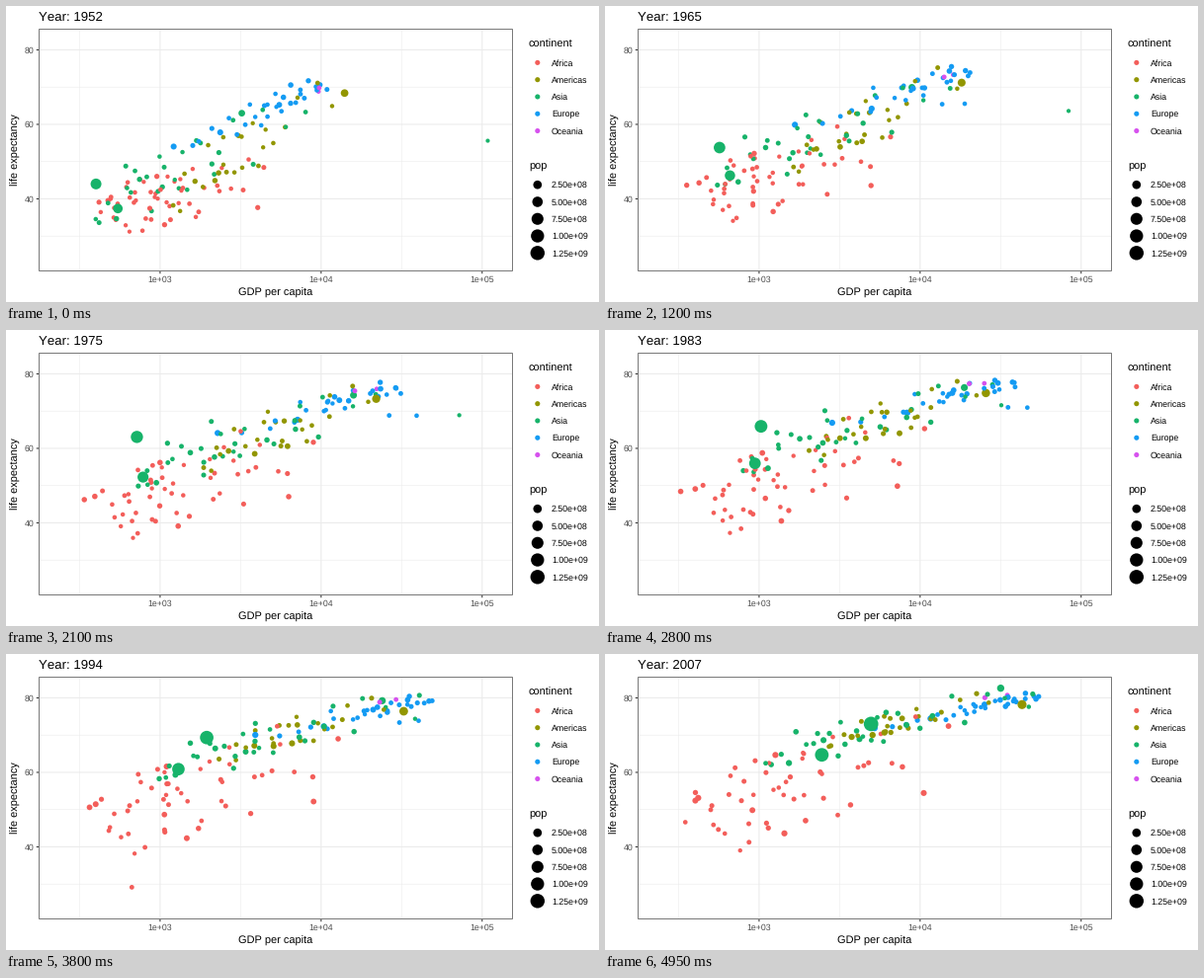
Recreate the animation shown at these times as a matplotlib script. Size 600x300 px, loop 5 s.

```python
import numpy as np
import matplotlib.pyplot as plt
from matplotlib.animation import FuncAnimation
from matplotlib.patches import Rectangle

plt.rcParams.update({
    "font.family": "Liberation Sans",
    "text.hinting": "none",
    "text.kerning_factor": 6,
})

W, H, DPI = 600, 300, 100
PT = 72 / DPI                      # points per pixel
FRAMES, INTERVAL = 100, 50
FIRST, LAST = 1952, 2007

LEFT, TOP, RIGHT, BOTTOM = 33.5, 23.5, 512.5, 268.5
X_RANGE = (2.2487, 5.1887)         # log10 of GDP
Y_RANGE = (20.649, 85.553)         # years of life

COLORS = {
    "Africa": "#F35E5A",
    "Americas": "#929600",
    "Asia": "#17B36A",
    "Europe": "#149BF3",
    "Oceania": "#D651EE",
}

# Each pair runs from the first year to the last: centre and spread of
# log GDP, mean life, its slope along GDP, its noise, median population.
CLOUDS = {
    "Africa": dict(count=51, skew=0.15, gdp=(3.02, 3.18), spread=(0.26, 0.40),
                   life=(39.5, 54.5), slope=(2.3, 5), noise=(4, 6.5), pop=(3, 9)),
    "Americas": dict(count=24, skew=0.1, gdp=(3.49, 3.87), spread=(0.25, 0.25),
                     life=(52, 73), slope=(6, 2.5), noise=(5, 2), pop=(4, 10)),
    "Asia": dict(count=29, skew=0.15, gdp=(3.10, 3.68), spread=(0.33, 0.42),
                 life=(47, 71), slope=(5.5, 4.2), noise=(4.5, 2.5), pop=(9, 24)),
    "Europe": dict(count=30, skew=-0.15, gdp=(3.67, 4.36), spread=(0.24, 0.26),
                   life=(64.5, 77.6), slope=(5, 2.5), noise=(1.8, 0.9), pop=(8, 10)),
    "Oceania": dict(count=2, skew=0, gdp=(4.01, 4.47), spread=(0.01, 0.04),
                    life=(69.2, 80.7), slope=(0, 0.3), noise=(0.2, 0.2), pop=(4, 9)),
}

# The dots that stand out: population in millions at both ends,
# then a few (year, GDP, life) points.
STANDOUTS = [
    ("Asia", 556, 1319, (1952, 400, 44), (1957, 576, 50.5), (1962, 488, 44.5),
     (1967, 613, 58.4), (1977, 741, 64), (1992, 1656, 68.7), (2007, 4959, 73)),
    ("Asia", 372, 1110, (1952, 547, 37.4), (1972, 724, 50.7), (1992, 1164, 60.2),
     (2007, 2452, 64.7)),
    ("Asia", 86, 127, (1952, 3217, 63), (1972, 14779, 73.4), (2007, 31656, 82.6)),
    ("Asia", 0.2, 2.5, (1952, 108382, 55.6), (1967, 80895, 64.6),
     (1972, 109348, 67.7), (1982, 31354, 71.3), (2007, 47307, 77.6)),
    ("Americas", 158, 301, (1952, 13990, 68.4), (1982, 25010, 74.7),
     (2007, 42952, 78.2)),
    ("Africa", 2.5, 9, (1952, 493, 40), (1987, 848, 44), (1992, 737, 23.6),
     (1997, 590, 36.1), (2007, 863, 46.2)),
]

YEARS = np.arange(FIRST, LAST + 1, 5)
TIME = (YEARS - FIRST) / (LAST - FIRST)
GAIN = TIME * (1.6 - 0.6 * TIME)   # quick progress first, slower later
rng = np.random.default_rng(12)


def to_x(log_gdp):
    lo, hi = X_RANGE
    return LEFT + (log_gdp - lo) / (hi - lo) * (RIGHT - LEFT)


def to_y(life):
    lo, hi = Y_RANGE
    return BOTTOM - (life - lo) / (hi - lo) * (BOTTOM - TOP)


def dot_width(size):
    return 0.75 * (2.845 * size + 0.945) + 1.2


def pop_width(millions):
    return dot_width(1 + 5 * np.sqrt(np.asarray(millions) / 1319))


def pop_path(start, end):
    return start * (end / start) ** TIME


def standout(start, end, *points):
    years, gdp, life = zip(*points)
    return (np.interp(YEARS, years, np.log10(gdp)),
            np.interp(YEARS, years, life),
            pop_width(pop_path(start, end)))


def cloud_dots(count, skew, gdp, spread, life, slope, noise, pop):
    def blend(pair):
        return pair[0] + (pair[1] - pair[0]) * GAIN

    for v in np.linspace(-1, 1, count):
        rank = 1.1 * v + 0.9 * v ** 3
        rank += skew * (rank ** 2 - 1)
        lean = np.clip(rng.normal(), -1.7, 1.7)
        # a boom or slump that fades again by the last year
        swing = np.clip(0.05 * rng.standard_t(2), -0.3, 0.6) * np.sin(np.pi * TIME)
        x = blend(gdp) + blend(spread) * rank + swing
        y = blend(life) + blend(slope) * rank + blend(noise) * lean
        x += rng.normal(0, 0.02, len(YEARS))
        y = np.clip(y, 29, 81) + rng.normal(0, 0.3, len(YEARS))
        scale = np.exp(np.clip(rng.normal(), -2, 1.8))
        yield x, y, pop_width(pop_path(*pop) * scale)


def build_dots():
    dots, colors = [], []
    for name, color in COLORS.items():
        group = list(cloud_dots(**CLOUDS[name]))
        group += [standout(*row[1:]) for row in STANDOUTS if row[0] == name]
        dots += group
        colors += [color] * len(group)
    order = rng.permutation(len(dots))
    return np.array(dots)[order], [colors[k] for k in order]


fig = plt.figure(figsize=(W / DPI, H / DPI), dpi=DPI, facecolor="white")
ax = fig.add_axes([0, 0, 1, 1])
ax.set_xlim(0, W)
ax.set_ylim(H, 0)
ax.axis("off")


def label(x, y, text, size, color="black", **kw):
    return ax.text(x, y, text, fontsize=size * PT, color=color,
                   va="baseline", **kw)


def line(xs, ys, color, width, z):
    ax.plot(xs, ys, color=color, lw=width * PT, zorder=z,
            solid_capstyle="butt", snap=False)


def draw_grid():
    for step in range(6):
        width = 1.07 if step % 2 else 0.53
        x = to_x(2.5 + step / 2)
        y = to_y(30 + 10 * step)
        if x < RIGHT:
            line([x, x], [TOP, BOTTOM], "#EBEBEB", width, 1)
        if y > TOP:
            line([LEFT, RIGHT], [y, y], "#EBEBEB", width, 1)


def draw_panel():
    draw_grid()
    ax.add_patch(Rectangle((LEFT, TOP), RIGHT - LEFT, BOTTOM - TOP, fill=False,
                           ec="#7A7A7A", lw=PT, zorder=4, snap=False))
    for power in (3, 4, 5):
        x = to_x(power)
        line([x, x], [BOTTOM, BOTTOM + 2.75], "#333333", 1.07, 3)
        label(x, 279.7, f"1e+0{power}", 8.8, "#4D4D4D", ha="center")
    for life in (40, 60, 80):
        y = to_y(life)
        line([LEFT - 2.75, LEFT], [y, y], "#333333", 1.07, 3)
        label(LEFT - 4.95, y + 3.2, str(life), 8.8, "#4D4D4D", ha="right")
    label((LEFT + RIGHT) / 2, 293.4, "GDP per capita", 11, ha="center")
    label(13, (TOP + BOTTOM) / 2, "life expectancy", 11, ha="center",
          rotation=90, rotation_mode="anchor")


def draw_legend(title, title_y, first_y, names, widths, colors):
    label(529, title_y, title, 11)
    ys = first_y + 17.28 * np.arange(len(names))
    ax.scatter(np.full(len(names), 537.8), ys, s=(np.array(widths) * PT) ** 2,
               c=colors, linewidths=0)
    for y, name in zip(ys, names):
        label(552, y + 3.2, name, 8.8)


draw_panel()
draw_legend("continent", 42, 57.4, list(COLORS), [dot_width(1.5)] * 5,
            list(COLORS.values()))
pops = 250 * np.arange(1, 6)
draw_legend("pop", 166, 181.2, [f"{p * 1e6:.2e}" for p in pops],
            pop_width(pops), ["black"] * 5)

dots, dot_colors = build_dots()
title = label(33, 15.3, "", 13.2)
cloud = ax.scatter(np.zeros(len(dots)), np.zeros(len(dots)), c=dot_colors,
                   linewidths=0, zorder=3)


def draw(i):
    progress = i / (FRAMES - 1)
    step = progress * (len(YEARS) - 1)
    k = min(int(step), len(YEARS) - 2)
    part = step - k
    x, y, width = (dots[:, :, k] * (1 - part) + dots[:, :, k + 1] * part).T
    cloud.set_offsets(np.column_stack([to_x(x), to_y(y)]))
    cloud.set_sizes((width * PT) ** 2)
    title.set_text(f"Year: {round(FIRST + (LAST - FIRST) * progress)}")
    return cloud, title


anim = FuncAnimation(fig, draw, frames=FRAMES, interval=INTERVAL,
                     repeat=True, repeat_delay=0)
plt.show()
```
